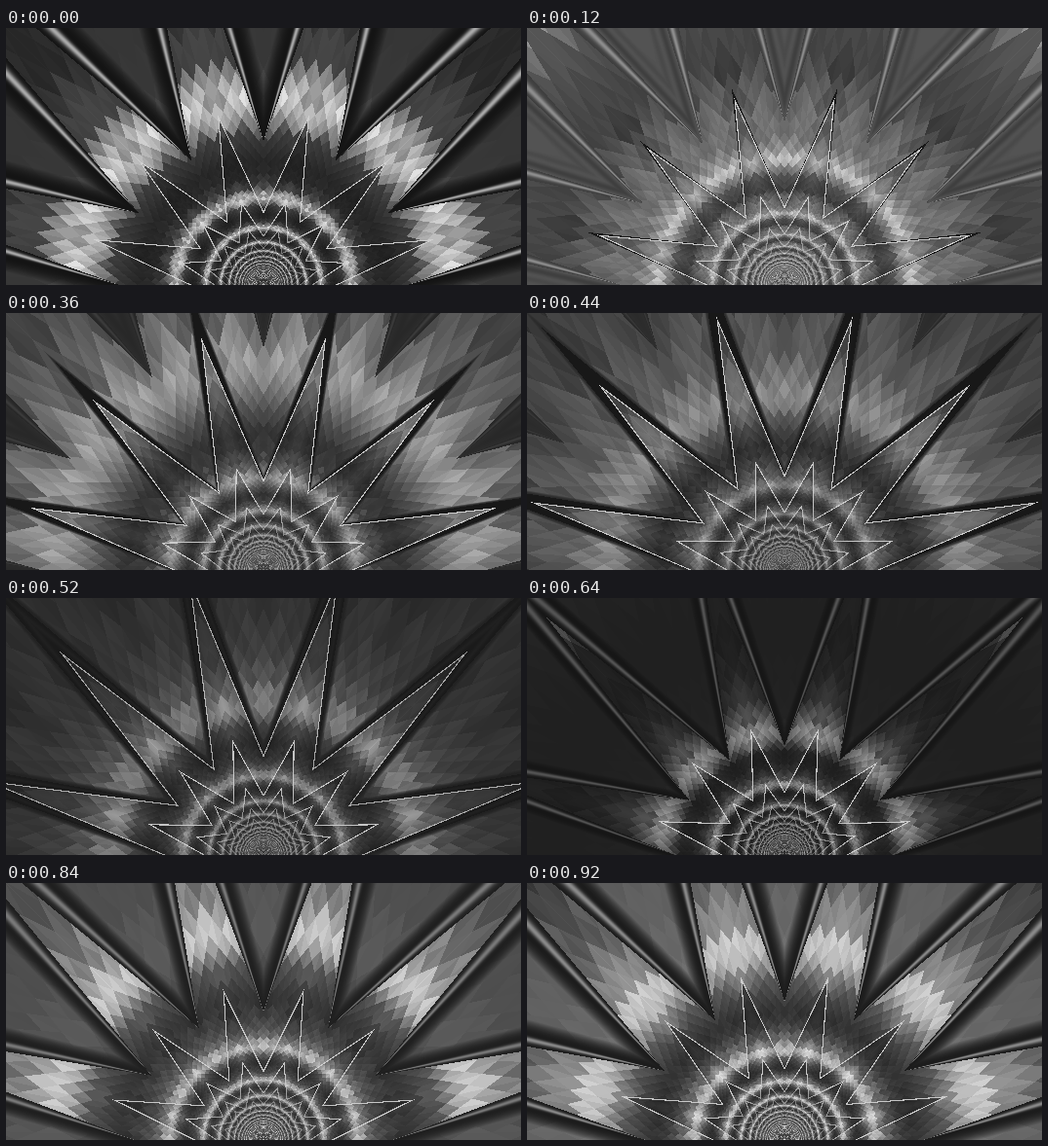
These frames come from a looping animation (528x264 px, 0.96 s). An HTML page with a canvas:

```html
<!DOCTYPE html>
<html>
<head>
<meta charset="utf-8">
<title>Star tunnel</title>
<style>
html, body { margin: 0; width: 100%; height: 100%; overflow: hidden; background: #222; }
canvas { display: block; width: 528px; height: 264px; }
</style>
</head>
<body>
<canvas id="stage" width="528" height="264"></canvas>
<script>
const W = 528, H = 264, HALF = W / 2, LOOP = 960, STEP = 40;
const ctx = document.getElementById('stage').getContext('2d');
const image = ctx.createImageData(W, H);
const pixels = new Uint32Array(image.data.buffer);

// Star outline in inverse radius: valley and tip values, and their change per loop.
const WEDGE = Math.PI / 12, SIN = Math.sin(WEDGE), COS = Math.cos(WEDGE);
const VALLEY = 0.01318, VALLEY_RATE = 0.0064, TIP = 0.0055, TIP_RATE = 0.0058;
const SIDE = (TIP - VALLEY * COS) / SIN;
const SIDE_RATE = (TIP_RATE - VALLEY_RATE * COS) / SIN;
const RING = 0.0058, ROWS = 9, COLS = 4, RIM = 0.0019;

// time, ring phase, five grey levels inward from the ring, far grey, rim grey, rim shine
const keys = [
  [0,   0.93, 205, 58, 40, 42, 72,  58, 20, 150],
  [120, 1.33, 195, 82, 62, 105, 118, 85, 62, 80],
  [240, 1.62, 168, 95, 60, 48, 92,  55, 35, 30],
  [440, 1.95, 150, 76, 46, 66, 92,  65, 42, 14],
  [640, 2.38, 145, 40, 35, 46, 70,  36, 22, 62],
  [760, 2.72, 195, 72, 48, 78, 95,  60, 35, 70],
  [920, 2.88, 202, 80, 50, 68, 112, 95, 28, 110],
  [960, 2.93, 205, 58, 40, 42, 72,  58, 20, 150]
];

const mix = (a, b, k) => a + (b - a) * k;
const clamp = x => x < 0 ? 0 : x > 1 ? 1 : x;
const ease = (a, b, x) => { const k = clamp((x - a) / (b - a)); return k * k * (3 - 2 * k); };

function hash(a, b) {
  let n = Math.imul(a + 31, 374761393) ^ Math.imul(b + 57, 668265263);
  n = Math.imul(n ^ (n >>> 13), 1274126177);
  return ((n ^ (n >>> 16)) >>> 0) / 4294967296;
}

function poseAt(ms) {
  let i = 0;
  while (i < keys.length - 2 && keys[i + 1][0] <= ms) i++;
  const a = keys[i], b = keys[i + 1];
  return a.map((v, n) => mix(v, b[n], (ms - a[0]) / (b[0] - a[0])));
}

// Polar geometry of the left half; the right half is its mirror.
const count = HALF * H;
const radius = new Float32Array(count), fold = new Float32Array(count);
const cosF = new Float32Array(count), sinF = new Float32Array(count);
for (let y = 0, i = 0; y < H; y++) {
  for (let x = 0; x < HALF; x++, i++) {
    const dx = HALF - x - 0.5, dy = H - y - 0.5;
    const angle = Math.atan2(dx, dy);
    const f = Math.abs(angle - Math.round(angle / (2 * WEDGE)) * 2 * WEDGE);
    radius[i] = Math.hypot(dx, dy);
    fold[i] = f;
    cosF[i] = Math.cos(f);
    sinF[i] = Math.sin(f);
  }
}

function level(pose, p) {
  p = (p - Math.floor(p)) * 5;
  const i = Math.floor(p) % 5;
  return mix(pose[2 + i], pose[2 + (i + 1) % 5], p - Math.floor(p));
}

function mosaic(pose, t, q, f) {
  const col = f / WEDGE * COLS, row = (q / RING + t) * ROWS;
  const i = Math.floor(row + col), j = Math.floor(row - col);
  const sum = i + j, wrapped = ((sum % (2 * ROWS)) + 2 * ROWS) % (2 * ROWS);
  const rnd = hash(i - j, wrapped);
  const facet = row + col - i > row - col - j ? 1.035 : 0.965;
  const depth = (sum + 1) / 2 / ROWS - t;
  return level(pose, depth - pose[1] + (rnd - 0.5) * 0.09) * facet * (0.93 + rnd * 0.14);
}

function shade(i, t, pose) {
  const r = radius[i], q = 1 / r, c = cosF[i], s = sinF[i];
  const rate = VALLEY_RATE * c + SIDE_RATE * s;
  const w = (VALLEY * c + SIDE * s - q) / rate;
  const age = t + Math.ceil(w - t), depth = age - w;

  let g = mosaic(pose, t, q, fold[i]);
  g = mix(g, pose[7] * (0.85 + 0.15 * g / 90), ease(1.5, 1.65, age));
  if (age < 0.75) g *= 0.75 + 0.4 * depth;

  // dark wall just outside the next star
  const next = age - 1;
  if (next > 0.3) {
    const a = VALLEY - VALLEY_RATE * next, b = SIDE - SIDE_RATE * next;
    const dist = (r * (a * c + b * s) - 1) / Math.hypot(a, b);
    const width = 16 * next * next;
    if (dist < width) {
      const k = dist / width;
      const stripe = 0.5 + 0.5 * Math.cos(k * 12);
      const wall = pose[8] + stripe * pose[9] * 0.25 * ease(1, 1.1, next);
      g = mix(wall, g, k * k);
    }
  }

  // rim inside the star and its fine inner line
  const rim = RIM * Math.max(0, age);
  const tube = depth * rate / (rim * s / SIN + 1e-9);
  const late = ease(0.5, 0.65, age);
  if (age < 2 && tube < 1) {
    const shine = Math.exp(-Math.pow((tube - 0.5) * 4.5, 2));
    g = mix(24, pose[8] + pose[9] * shine, late);
  }
  if (late < 1) {
    const a = VALLEY - VALLEY_RATE * age, b = SIDE - SIDE_RATE * age + rim / SIN;
    const dist = (1 - r * (a * c + b * s)) / Math.hypot(a, b);
    if (dist >= 0 && dist < 1.1) {
      g = mix(g, 215, (1 - late) * Math.min(0.9, r / 80));
    }
  }
  return g;
}

let shown = -1;
function draw(now) {
  const ms = Math.floor(now % LOOP / STEP) * STEP;
  if (ms !== shown) {
    shown = ms;
    const pose = poseAt(ms), t = ms / LOOP;
    for (let y = 0, i = 0; y < H; y++) {
      for (let x = 0; x < HALF; x++, i++) {
        const g = Math.max(0, Math.min(255, shade(i, t, pose))) | 0;
        pixels[y * W + x] = pixels[y * W + W - 1 - x] = (255 << 24) | (g << 16) | (g << 8) | g;
      }
    }
    ctx.putImageData(image, 0, 0);
  }
}

const start = performance.now();
function tick() {
  draw(performance.now() - start);
  requestAnimationFrame(tick);
}
tick();
</script>
</body>
</html>
```
